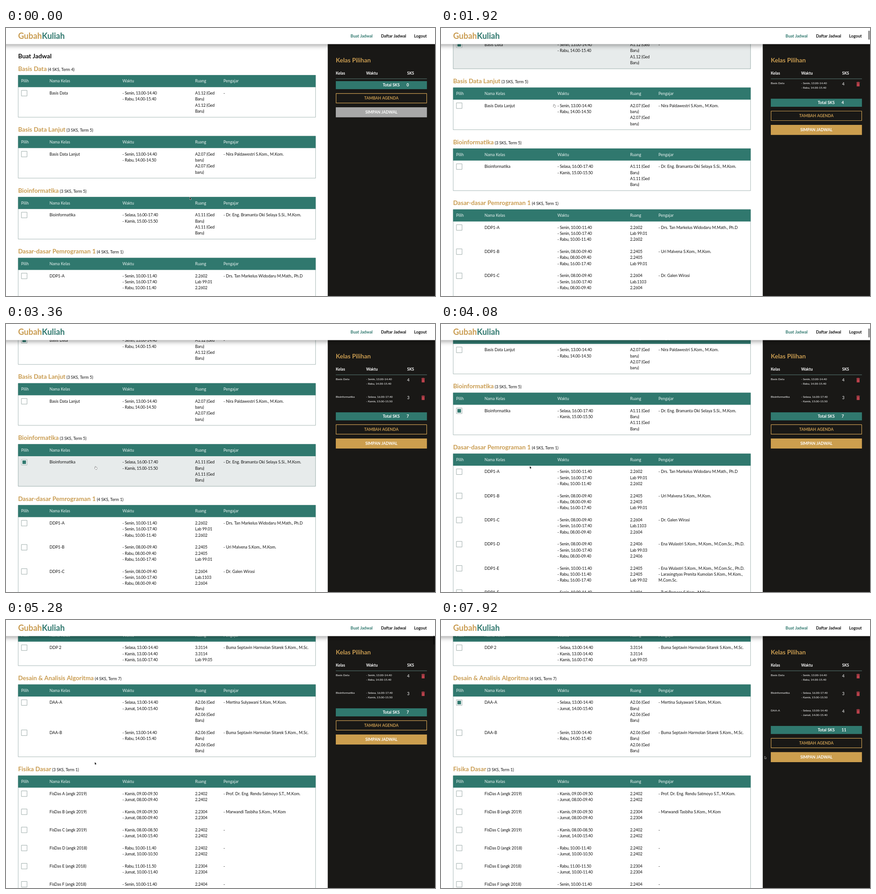
Write an HTML page with a canvas that moves like this. It is 947 px wide and 592 px high and loops after 8000 ms.

```html
<!DOCTYPE html>
<html lang="id">
<head>
<meta charset="utf-8">
<title>GubahKuliah</title>
<style>
  html, body { margin: 0; width: 100%; height: 100%; overflow: hidden; background: #fff; }
  canvas { display: block; width: 947px; height: 592px; }
</style>
</head>
<body>
<canvas id="stage"></canvas>
<script>
const W = 947, H = 592, LOOP = 8000, STEP = 120;
const TEAL = '#30786e', GOLD = '#c99c51', INK = '#111', DARK = '#191816';
const LINE = 13.34, HEAD = LINE * 2, GAP = 41.2;
const SIDE = W * 0.75, LEFT = 26.68, RIGHT = SIDE - LEFT;
const COLS = [33.5, 96, 257, 417.5, 480];
const TITLES = ['Pilih', 'Nama Kelas', 'Waktu', 'Ruang', 'Pengajar'];

const canvas = document.getElementById('stage');
const ctx = canvas.getContext('2d');
const dpr = window.devicePixelRatio || 1;
canvas.width = W * dpr;
canvas.height = H * dpr;

// Each row: name, times, rooms, lecturers
const sections = [
  ['Basis Data', '4 SKS, Term 4', [
    ['Basis Data', 'Senin, 13.00-14.40|Rabu, 14.00-15.40', 'A1.12 (Ged|Baru)|A1.12 (Ged|Baru)', '-']]],
  ['Basis Data Lanjut', '3 SKS, Term 5', [
    ['Basis Data Lanjut', 'Senin, 13.00-14.40|Rabu, 14.00-14.50', 'A2.07 (Ged|baru)|A2.07 (Ged|baru)', '- Nira Paldawestri S.Kom., M.Kom.']]],
  ['Bioinformatika', '3 SKS, Term 5', [
    ['Bioinformatika', 'Selasa, 16.00-17.40|Kamis, 15.00-15.50', 'A1.11 (Ged|Baru)|A1.11 (Ged|Baru)', '- Dr. Eng. Bramanta Oki Selaya S.Si., M.Kom.']]],
  ['Dasar-dasar Pemrograman 1', '4 SKS, Term 1', [
    ['DDP1-A', 'Senin, 10.00-11.40|Senin, 16.00-17.40|Rabu, 10.00-11.40', '2.2602|Lab 99.01|2.2602', '- Drs. Tan Markelus Widodaru M.Math., Ph.D'],
    ['DDP1-B', 'Senin, 08.00-09.40|Rabu, 08.00-09.40|Rabu, 16.00-17.40', '2.2405|2.2405|Lab 99.01', '- Uri Malvena S.Kom., M.Kom.'],
    ['DDP1-C', 'Senin, 08.00-09.40|Senin, 16.00-17.40|Rabu, 08.00-09.40', '2.2604|Lab.1103|2.2604', '- Dr. Galen Wirasi'],
    ['DDP1-D', 'Senin, 08.00-09.40|Senin, 16.00-17.40|Rabu, 08.00-09.40', '2.2406|Lab 99.03|2.2406', '- Ena Wulastri S.Kom., M.Kom., M.Com.Sc., Ph.D.'],
    ['DDP1-E', 'Senin, 10.00-11.40|Rabu, 10.00-11.40|Rabu, 16.00-17.40', '2.2405|2.2405|Lab 99.02', '- Ena Wulastri S.Kom., M.Kom., M.Com.Sc., Ph.D.|- Larasingtyas Prenita Kumolan S.Kom., M.Kom.,|M.Com.Sc.'],
    ['DDP1-F', 'Senin, 10.00-11.40|Rabu, 10.00-11.40|Kamis, 16.00-17.40', '2.2406|2.2406|Lab 99.01', '- Tuti Ramesa S.Kom., M.Kom'],
    ['DDP1-G', 'Senin, 10.00-11.40|Rabu, 10.00-11.40|Kamis, 16.00-17.40', '2.2307|2.2307|Lab 99.02', '- Uri Malvena S.Kom., M.Kom.|- Dr. Galen Wirasi']]],
  ['Dasar-dasar Pemrograman 2', '4 SKS, Term 2', [
    ['DDP 2', 'Selasa, 13.00-14.40|Kamis, 13.00-14.40|Kamis, 16.00-17.40', '3.3114|3.3114|Lab 99.05', '- Buma Septavin Harmolan Sitarek S.Kom., M.Sc.']]],
  ['Desain & Analisis Algoritma', '4 SKS, Term 7', [
    ['DAA-A', 'Selasa, 13.00-14.40|Jumat, 14.00-15.40', 'A2.06 (Ged|Baru)|A2.06 (Ged|Baru)', '- Mertina Sulyawani S.Kom, M.Kom.'],
    ['DAA-B', 'Senin, 13.00-14.40|Rabu, 14.00-15.40', 'A2.06 (Ged|Baru)|A2.06 (Ged|Baru)', '- Buma Septavin Harmolan Sitarek S.Kom., M.Sc.']]],
  ['Fisika Dasar', '3 SKS, Term 1', [
    ['FisDas A (angk 2019)', 'Kamis, 09.00-09.50|Jumat, 08.00-09.40', '2.2402|2.2402', '- Prof. Dr. Eng. Rendu Satmoyo S.T., M.Kom.'],
    ['FisDas B (angk 2019)', 'Kamis, 09.00-09.50|Jumat, 08.00-09.40', '2.2304|2.2304', '- Marwandi Tasbiha S.Kom., M.Kom'],
    ['FisDas C (angk 2019)', 'Kamis, 08.00-08.50|Jumat, 14.00-15.40', '2.2402|2.2402', '-'],
    ['FisDas D (angk 2018)', 'Rabu, 10.00-11.40|Jumat, 10.00-10.50', '2.2402|2.2402', '-'],
    ['FisDas E (angk 2018)', 'Rabu, 11.00-11.50|Jumat, 10.00-11.40', '2.2304|2.2304', '-'],
    ['FisDas F (angk 2018)', 'Senin, 10.00-11.40|Rabu, 10.00-10.50', '2.2404|2.2404', '-']]]
].map(([title, info, rows]) => ({
  title, info,
  rows: rows.map(([name, times, rooms, staff]) => ({
    name,
    times: times.split('|').map(s => '- ' + s),
    rooms: rooms.split('|'),
    staff: staff.split('|')
  }))
}));

// Lay out the page once
let flow = 104;
for (const s of sections) {
  s.y = flow;
  flow += HEAD;
  for (const r of s.rows) {
    r.y = flow;
    r.h = LINE * (Math.max(r.times.length, r.rooms.length) + 1);
    flow += r.h;
  }
  s.end = flow;
  flow += GAP;
}
const allRows = sections.flatMap(s => s.rows);

const picks = [
  { at: 1200, name: 'Basis Data', sks: 4 },
  { at: 3120, name: 'Bioinformatika', sks: 3 },
  { at: 6360, name: 'DAA-A', sks: 4 }
].map(p => ({ ...p, times: allRows.find(r => r.name === p.name).times }));

const scrollKeys = [
  [1680, 0], [1800, 62], [1920, 107], [2040, 107.8], [3480, 107.8], [3600, 116],
  [3840, 172], [4080, 221.4], [4320, 345], [4560, 529.6], [4800, 725], [5040, 872],
  [5160, 915], [5280, 928]
];
const cursorKeys = [
  [0, 405.5, 373.5], [840, 248, 168], [2040, 248, 168], [2760, 196, 314],
  [5280, 196, 314], [6000, 190, 190], [6840, 190, 190], [7680, 712, 302], [7920, 714.5, 301]
];

const smooth = k => k * k * (3 - 2 * k);

function sample(keys, t, ease = k => k) {
  let i = 0;
  while (i < keys.length - 1 && keys[i + 1][0] <= t) i++;
  const a = keys[i], b = keys[i + 1];
  if (!b || t <= a[0]) return a.slice(1);
  const k = ease((t - a[0]) / (b[0] - a[0]));
  return a.slice(1).map((v, j) => v + (b[j + 1] - v) * k);
}

const scrollAt = t => sample(scrollKeys, t)[0];
const cursorAt = t => sample(cursorKeys, t, smooth);
const within = (t, a, b) => t >= a && t <= b;

// Hover keeps its state while the page scrolls
function hoverAt(t) {
  if (within(t, 3600, 5280)) return null;
  if (within(t, 1800, 2040)) t = 1680;
  const [x, y] = cursorAt(t);
  const py = y + scrollAt(t);
  if (x < LEFT || x > RIGHT) return null;
  return allRows.find(r => py >= r.y && py < r.y + r.h) || null;
}

function rect(x, y, w, h, color) {
  ctx.fillStyle = color;
  ctx.fillRect(x, y, w, h);
}

function frame(x, y, w, h, color, lw = 1) {
  ctx.strokeStyle = color;
  ctx.lineWidth = lw;
  ctx.strokeRect(x + lw / 2, y + lw / 2, w - lw, h - lw);
}

function text(str, x, y, size = 8.9, color = INK, { bold = false, align = 'left', track = 0 } = {}) {
  ctx.font = `${bold ? 700 : 400} ${size}px Lato, "Open Sans", sans-serif`;
  ctx.letterSpacing = track + 'px';
  ctx.textAlign = align;
  ctx.fillStyle = color;
  ctx.fillText(str, x, y);
  return ctx.measureText(str).width;
}

const bold = (str, x, y, size, color, align) => text(str, x, y, size, color, { bold: true, align });

function drawRow(r, hovered, checked) {
  if (hovered) rect(LEFT, r.y, RIGHT - LEFT, r.h, '#e7ebeb');
  const base = r.y + LINE + 3;
  rect(33.5, r.y + 6.6, 13.4, 13.4, '#fff');
  frame(33.5, r.y + 6.6, 13.4, 13.4, '#9dacaa');
  if (checked) rect(36.2, r.y + 9.3, 8, 8, TEAL);
  text(r.name, COLS[1], base);
  const column = (lines, x, track) =>
    lines.forEach((s, i) => text(s, x, base + i * LINE, 8.9, INK, { track }));
  column(r.times, COLS[2], -0.2);
  column(r.rooms, COLS[3], -0.12);
  column(r.staff, COLS[4], 0);
}

function drawPage(t) {
  const top = scrollAt(t), hover = hoverAt(t);
  const chosen = picks.filter(p => t >= p.at).map(p => p.name);
  ctx.save();
  ctx.translate(0, -top);
  bold('Buat Jadwal', LEFT, 66.8, 13.8, INK);
  for (const s of sections) {
    if (s.end < top || s.y - 30 > top + H) continue;
    const w = bold(s.title, LEFT, s.y - 9.3, 13.6, GOLD);
    text(`(${s.info})`, LEFT + w + 2.4, s.y - 9.3);
    for (const r of s.rows) drawRow(r, r === hover, chosen.includes(r.name));
    frame(LEFT, s.y, RIGHT - LEFT, s.end - s.y, '#5f7f7a', 0.56);
    rect(LEFT, s.y, RIGHT - LEFT, HEAD, TEAL);
    TITLES.forEach((c, i) => text(c, COLS[i], s.y + LINE + 3, 8.9, '#eaf3f1'));
  }
  ctx.restore();
}

function drawTrash(x, y) {
  const red = '#b9414b';
  rect(x + 2.3, y, 3, 1, red);
  rect(x, y + 0.7, 7.6, 1.3, red);
  rect(x + 0.6, y + 2.5, 6.4, 7.5, red);
}

function drawSidebar(t) {
  const x = SIDE + 17.78, w = W - 17.78 - x, mid = x + w / 2;
  const list = picks.filter(p => t >= p.at);
  rect(SIDE, 0, W - SIDE, H, DARK);
  bold('Kelas Pilihan', x, 75.8, 13.7, GOLD);
  bold('Kelas', x, 103.3, 8.6, '#fff');
  bold('Waktu', 795, 103.3, 8.6, '#fff');
  bold('SKS', 885.5, 103.3, 8.6, '#fff');
  rect(x, 111.7, w, 1, '#5b7a76');
  list.forEach((p, i) => {
    const y = 124.4 + i * 38.9;
    text(p.name, x, y, 6.5, '#fff');
    p.times.forEach((s, j) => text(s, 795, y + j * 10, 6.5, '#fff', { track: -0.1 }));
    text(p.sks, 885.5, y + 2.6, 8.9, '#fff');
    drawTrash(917, y - 5.4);
  });
  const y = 117.3 + list.length * 38.9;
  const total = list.reduce((sum, p) => sum + p.sks, 0);
  rect(x, y, w, 17.8, TEAL);
  bold('Total SKS', 869, y + 11.9, 8.9, '#fff', 'right');
  bold(total, 884.3, y + 11.9, 8.9, '#fff');
  frame(x, y + 26.7, w, 22.2, GOLD, 1.2);
  bold('TAMBAH AGENDA', mid, y + 41, 8.7, GOLD, 'center');
  rect(x, y + 57.8, w, 22.2, list.length ? '#cc9e4e' : '#a8a8a8');
  bold('SIMPAN JADWAL', mid, y + 72, 8.7, '#fff', 'center');
}

function drawHeader() {
  ctx.save();
  ctx.shadowColor = 'rgba(0,0,0,.36)';
  ctx.shadowBlur = 10 * dpr;
  ctx.shadowOffsetY = 3 * dpr;
  rect(-20, -20, W + 40, 55.6, '#fff');
  ctx.restore();
  const w = bold('Gubah', LEFT, 23.6, 18, GOLD);
  bold('Kuliah', LEFT + w, 23.6, 18, TEAL);
  bold('Buat Jadwal', 760.5, 20.6, 9.1, TEAL);
  bold('Daftar Jadwal', 827.7, 20.6, 9.1, INK);
  bold('Logout', 929, 20.6, 9.1, INK, 'right');
}

function drawScrollbar(t) {
  if (!within(t, 1800, 2400) && !within(t, 3600, 5640)) return;
  ctx.fillStyle = 'rgba(0,0,0,.5)';
  ctx.beginPath();
  ctx.roundRect(943.3, 2 + scrollAt(t) * 0.035, 3, 20, 1.5);
  ctx.fill();
}

function shape(points, x, y, fill, stroke, lw) {
  ctx.beginPath();
  points.forEach(([px, py]) => ctx.lineTo(x + px, y + py));
  ctx.closePath();
  ctx.lineJoin = 'round';
  ctx.strokeStyle = stroke;
  ctx.lineWidth = lw;
  ctx.stroke();
  ctx.fillStyle = fill;
  ctx.fill();
}

const ARROW = [[0, 0], [0, 5.2], [1.2, 4.2], [2, 6], [2.8, 5.6], [2.1, 3.9], [3.7, 3.8]];
const HAND = [[1, 0.6], [1.8, 0.6], [2, 2.6], [4.6, 3], [4.9, 4.4], [4.2, 7], [1.8, 7], [-0.4, 4.4], [0.1, 3.8], [1, 4.4]];

function drawCursor(t) {
  const [x, y] = cursorAt(t);
  if (hoverAt(t)) shape(HAND, x, y, '#fff', '#333', 1);
  else shape(ARROW, x, y, '#111', '#fff', 1);
}

function draw(now) {
  const t = Math.floor((now % LOOP) / STEP) * STEP;
  ctx.setTransform(dpr, 0, 0, dpr, 0, 0);
  rect(0, 0, W, H, '#fff');
  drawPage(t);
  drawSidebar(t);
  drawHeader();
  drawScrollbar(t);
  drawCursor(t);
}

const start = performance.now();
function tick() {
  draw(performance.now() - start);
  requestAnimationFrame(tick);
}
tick();
</script>
</body>
</html>
```
